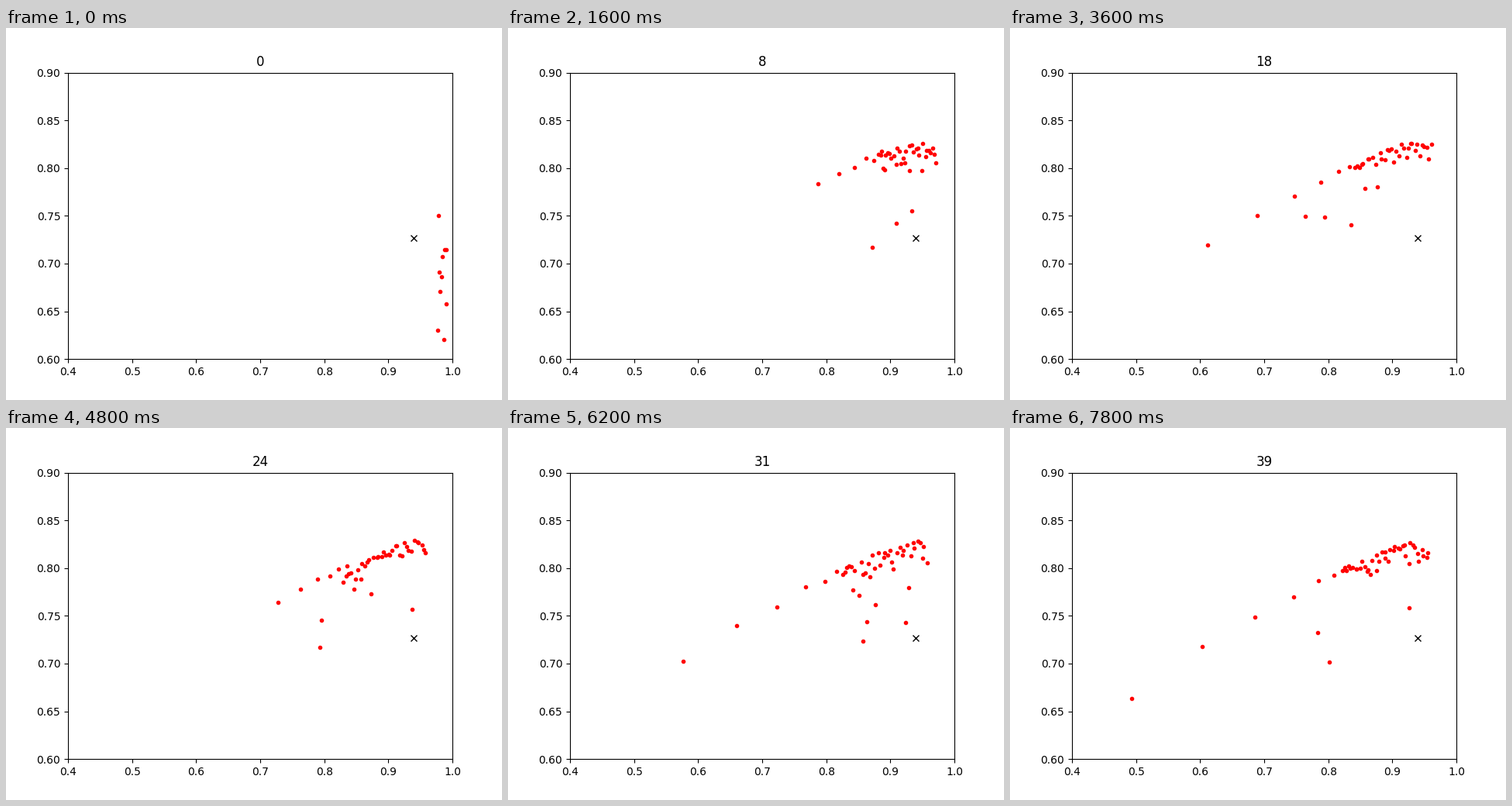
Write a matplotlib script that moves like this. It is 640x480 px and loops after 8 s.

```python
import matplotlib.pyplot as plt
import numpy as np
from matplotlib.animation import FuncAnimation

GENERATIONS = 40
STEP_MS = 200
TARGET = (0.9395, 0.7268)

# How far left the leading point has wandered: generation, x.
LEADER = [(0, .97), (4, .878), (12, .695), (18, .612),
          (24, .728), (31, .577), (39, .493)]


def ridge(x):
    """Upper edge of the band the population settles on."""
    d = .93 - x
    return .83 - np.where(d > 0, .26 * d + .25 * d ** 2, -.115 * d)


def decay(n, start, end, rate):
    return end + (start - end) * np.exp(-n / rate)


def population(n):
    rng = np.random.default_rng(100 + n)
    left = decay(n, .975, .825, 9)
    right = decay(n, .992, .957, 10)

    # Main band: evenly filled, sinking below the ridge only at the start.
    count = round(10 + 18 * min(n / 4, 1) + 10 * n / GENERATIONS)
    x = left + (right - left) * (np.arange(count) + rng.random(count)) / count
    sink = decay(n, .12, 0, 2.5) * rng.uniform(.2, 1.6, count)
    band = x, ridge(x) - sink - rng.exponential(.009, count)

    # Tail: thins out along the ridge towards the leading point.
    count = min(2 * n, 8)
    reach = left - np.interp(n, *zip(*LEADER))
    x = left - reach * (np.arange(1, count + 1) / max(count, 1)) ** 3
    tail = x, ridge(x) - rng.exponential(.004, count)

    # Strays well below the band.
    count = min(n, 3)
    x = rng.uniform(left - reach / 2, right, count)
    strays = x, ridge(x) - rng.uniform(.025, .1, count)

    return np.hstack([band, tail, strays])


fig, ax = plt.subplots(figsize=(6.4, 4.8), dpi=100)
ax.set_xlim(0.4, 1.0)
ax.set_ylim(0.6, 0.9)
dots, = ax.plot([], [], "r.")
ax.plot(*TARGET, "kx")
title = ax.set_title("0")


def draw(n):
    dots.set_data(*population(n))
    title.set_text(str(n))
    return dots, title


anim = FuncAnimation(fig, draw, frames=GENERATIONS, interval=STEP_MS,
                     repeat=True)
plt.show()
```
